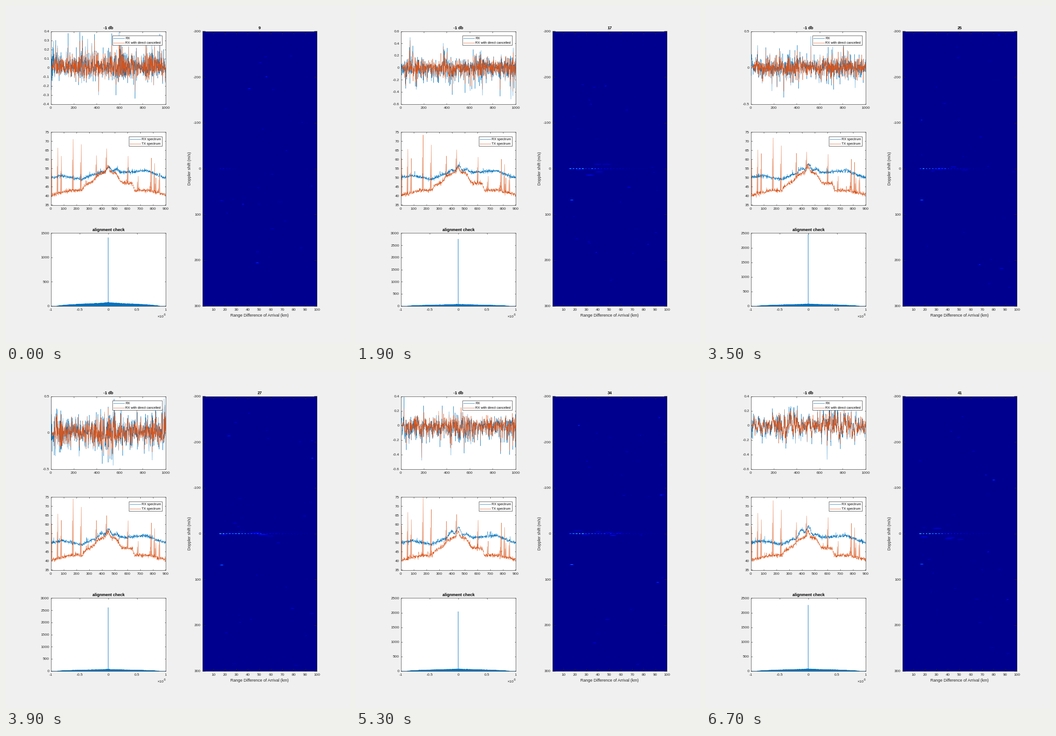
Animation of 756x741 px, one loop 6.9 s. Source, as a matplotlib script:

```python
import numpy as np
import matplotlib.pyplot as plt
from matplotlib.animation import FuncAnimation
from matplotlib.colors import LinearSegmentedColormap
from matplotlib.patches import Rectangle

W, H = 756, 741
BLUE, ORANGE, INK = "#0072BD", "#D95319", "#262626"
FIRST, LAST = 9, 41
TICK, LABEL, LEGEND = 8.2, 9.0, 7.4  # font sizes in pixels
FRAME_WIDTH, TRACE_WIDTH = 0.7, 0.47

plt.rcParams["font.family"] = "Liberation Sans"
plt.rcParams["axes.unicode_minus"] = False

# Levels at a few scans; the scans between them are interpolated.
KEY_SCANS = [9, 17, 22, 27, 31, 36, 41]
ALIGN_PEAK = [1410, 2760, 2255, 2615, 1120, 2655, 2265]
SIGNAL_HIGH = [.4, .5, .37, .47, .28, .46, .33]
SIGNAL_LOW = [-.34, -.52, -.35, -.45, -.41, -.53, -.47]
CLUTTER = [.25, .75, .5, .85, .4, 1.1, .75]

# Spectrum outlines and the strongest carriers, as (bin, level)
RX_SHAPE = [(0, 50), (90, 51.1), (240, 49), (330, 51.8), (600, 53), (750, 54), (850, 51), (900, 50)]
TX_SHAPE = [(0, 40.3), (150, 43), (245, 43), (260, 45.2), (330, 48), (370, 51.5), (430, 53.2),
            (510, 52.5), (555, 47.2), (640, 46.8), (655, 43), (760, 43), (900, 40.7)]
CARRIERS = [(8, 60), (55, 66), (83, 62.5), (175, 73), (238, 68), (358, 62), (437, 65),
            (605, 63), (788, 61), (813, 58)]

DOPPLER_MAP = LinearSegmentedColormap.from_list(
    "doppler", ["#00008f", "#0000ff", "#0080ff", "#00ffff", "#ffff90"])


def at_scan(levels, scan):
    return np.interp(scan, KEY_SCANS, levels)


def progress(scan):
    return (scan - FIRST) / (LAST - FIRST)


def bump(x, center, width):
    return np.exp(-((x - center) / width)**2)


def received(scan, rng):
    """Heavy-tailed noise that drifts more slowly in later scans."""
    n = np.arange(1000)
    mix = .1 + .45 * progress(scan)**2
    slow = np.convolve(rng.normal(size=1000), np.hanning(14), "same")
    envelope = 1 + .25 * np.sin(n / rng.uniform(40, 90) + rng.uniform(0, 6))
    rx = envelope * ((1 - mix) * rng.standard_t(6, 1000) + mix * slow / slow.std())
    lo, hi = at_scan(SIGNAL_LOW, scan), at_scan(SIGNAL_HIGH, scan)
    rx = np.where(rx > 0, rx * hi / rx.max(), rx * lo / rx.min())
    cancelled = .75 * rx + rng.normal(0, .035, 1000)
    return rx, cancelled * np.clip(n / 30, 0, 1)**2, lo, hi


def signal_limits(lo, hi):
    if max(-lo, hi) <= .4:
        return -.4, .4, .1
    if min(-lo, hi) > .4 and max(-lo, hi) <= .5:
        return -.5, .5, .5
    return .2 * np.floor(lo / .2), .2 * np.ceil(hi / .2), .2


def spectra(scan, rng):
    f = np.arange(900)
    grow = progress(scan)
    rx = np.interp(f, *zip(*RX_SHAPE)) + rng.normal(0, .5, 900)
    rx += (1 + 4 * grow) * bump(f, 398, 28) + (3.5 + 3 * grow) * bump(f, 453, 24) + 2 * bump(f, 512, 28)
    tx = np.interp(f, *zip(*TX_SHAPE)) + rng.normal(0, .55, 900) + 3 * bump(f, 450, 13)

    def carrier(x, level):
        for offset, share in ((0, 1), (1, .4), (-6, .6)):
            rise = share * (level - tx[x + offset])
            tx[x + offset] += max(rise, 0)

    for x, level in CARRIERS:
        carrier(x, level + rng.normal(0, .8))
    fixed = np.random.default_rng(5)
    for x in fixed.integers(680, 895, 6):
        carrier(x, fixed.uniform(47, 57))
    for spectrum in (rx, tx):
        spectrum[rng.integers(0, 900, 14)] += rng.uniform(.8, 2.5, 14)
    return rx, tx


def alignment(scan, rng):
    lag = np.linspace(-1, 1, 1601)
    level = np.interp(abs(lag), [0, .06, .3, .5, .75, .91], [78, 70, 52, 43, 23, 0])
    level *= rng.uniform(.78, 1.03, lag.size)
    level[::2] = 0
    peak = at_scan(ALIGN_PEAK, scan)
    level[800] = peak
    return lag, level, peak


def doppler(scan, rng):
    grid = np.zeros((604, 252))
    columns = np.arange(252)

    def echo(km, speed, width, strength):
        center = (km - .5) / 99.7 * 252
        row = int(round((speed + 300) / 600 * 602))
        profile = strength * np.exp(-((columns - center) / (1.27 * width))**4)
        for r, share in ((row, 1), (row + 1, .45)):
            grid[r] = np.maximum(grid[r], share * profile)

    # Direct-path clutter: dashes at zero speed that fade with range
    power = at_scan(CLUTTER, scan)
    reach = 6 + 48 * power**2
    for km in np.arange(15.8, 99, 2.7):
        strength = power * bump(km, 15, reach) * rng.uniform(.6, 1.15)
        echo(km, 0, rng.uniform(.8, 1.8) + power**4, strength)
    for _ in range(int(14 * power**3)):
        echo(rng.uniform(18, 60), rng.normal(0, 6), rng.uniform(3, 8), rng.uniform(.1, .3))

    # A steady target, a few stronger echoes and faint specks
    echo(17, 70 - 3 * progress(scan), 3, .7 * min(power, .8))
    for count, low, high in ((4, .2, .4), (24, .03, .16)):
        for _ in range(count):
            echo(rng.uniform(15, 99), rng.uniform(-298, 298), rng.uniform(1, 3.5), rng.uniform(low, high))
    return grid


def panel(left, top, right, bottom, xlim, ylim, tick_length=2.5):
    ax = fig.add_axes([left / W, 1 - bottom / H, (right - left) / W, (bottom - top) / H])
    ax.set(xlim=xlim, ylim=ylim)
    ax.tick_params(direction="in", top=True, right=True, length=tick_length, width=FRAME_WIDTH,
                   color=INK, labelcolor=INK, labelsize=TICK)
    ax.tick_params(axis="x", pad=5)
    ax.tick_params(axis="y", pad=3.5)
    for axis in (ax.xaxis, ax.yaxis):
        axis.set_major_formatter(lambda v, _: f"{round(v, 3) + 0:g}")
    for spine in ax.spines.values():
        spine.set(linewidth=FRAME_WIDTH, color=INK)
    return ax


def write(x, y, text, size, color=INK, **style):
    return stage.text(x, y, text, fontsize=size, color=color, **style)


def title(x, y, text):
    return write(x, y, text, LABEL, "black", weight="bold", ha="center")


def legend(left, top, names):
    stage.add_patch(Rectangle((left, top), 342.5 - left, 21, fc="white", ec=INK, lw=FRAME_WIDTH))
    for i, (name, color) in enumerate(zip(names, (BLUE, ORANGE))):
        y = top + 6 + 10 * i
        stage.plot([left + 2, left + 26], [y, y], color=color, lw=FRAME_WIDTH)
        write(left + 28.5, y + 2.7, name, LEGEND, "black")


def trace(ax, color, x):
    return ax.plot(x, np.zeros(len(x)), color=color, lw=TRACE_WIDTH)[0]


fig = plt.figure(figsize=(W / 72, H / 72), dpi=72, facecolor="#f0f0f0")

signal_ax = panel(98.5, 55.5, 350.9, 215.5, (0, 1000), (-.4, .4))
spectrum_ax = panel(98.5, 277.5, 350.9, 437.5, (0, 900), (35, 75))
align_ax = panel(98.5, 499.5, 350.9, 659.5, (-1, 1), (0, 1500))
map_ax = panel(431.5, 55.5, 683.4, 659.5, (.5, 100.2), (300, -300), 6)
signal_ax.set_xticks(range(0, 1001, 200))
spectrum_ax.set_xticks(range(0, 901, 100))
spectrum_ax.set_yticks(range(35, 76, 5))
align_ax.set_xticks([-1, -.5, 0, .5, 1])

rx_line = trace(signal_ax, BLUE, np.arange(1000))
cancelled_line = trace(signal_ax, ORANGE, np.arange(1000))
rx_spectrum = trace(spectrum_ax, BLUE, np.arange(900))
tx_spectrum = trace(spectrum_ax, ORANGE, np.arange(900))
align_line = trace(align_ax, BLUE, np.linspace(-1, 1, 1601))
heat = map_ax.imshow(np.zeros((604, 252)), cmap=DOPPLER_MAP, vmin=0, vmax=1, aspect="auto",
                     extent=(.5, 100.2, 300, -300), interpolation="nearest")
map_ax.set_xticks(range(10, 101, 10))
map_ax.set_yticks(range(-300, 301, 100))

stage = fig.add_axes([0, 0, 1, 1], zorder=5)
stage.set(xlim=(0, W), ylim=(H, 0))
stage.axis("off")
title(225, 51.3, "-1 db")
title(225, 495.3, "alignment check")
scan_title = title(557.5, 51.3, "")
write(557.5, 683, "Range Difference of Arrival (km)", LABEL, ha="center")
write(403.5, 357.5, "Doppler shift (m/s)", LABEL, rotation=90, ha="center", va="center")
write(332, 685, "×10", TICK)
write(346.3, 681.3, "6", 6.6)
legend(233.5, 64.5, ("RX", "RX with direct cancelled"))
legend(269.5, 286.5, ("RX spectrum", "TX spectrum"))


def update(frame):
    # The opening scan holds for 500 ms, every later one for 200 ms.
    scan = FIRST if frame < 5 else min(LAST, FIRST + 1 + (frame - 5) // 2)
    rng = np.random.default_rng(scan)

    rx, cancelled, lo, hi = received(scan, rng)
    rx_line.set_ydata(rx)
    cancelled_line.set_ydata(cancelled)
    bottom, top, step = signal_limits(lo, hi)
    signal_ax.set_yticks(np.arange(bottom, top + step / 2, step))
    signal_ax.set_ylim(bottom, top)

    for line, values in zip((rx_spectrum, tx_spectrum), spectra(scan, rng)):
        line.set_ydata(values)

    lag, level, peak = alignment(scan, rng)
    align_line.set_data(lag, level)
    step = 200 if peak <= 1200 else 500
    top = step * np.ceil(peak / step)
    align_ax.set_yticks(np.arange(0, top + 1, step))
    align_ax.set_ylim(0, top)

    heat.set_data(doppler(scan, rng))
    scan_title.set_text(str(scan))
    return []


animation = FuncAnimation(fig, update, frames=69, interval=100, repeat=True, repeat_delay=0)
plt.show()
```
